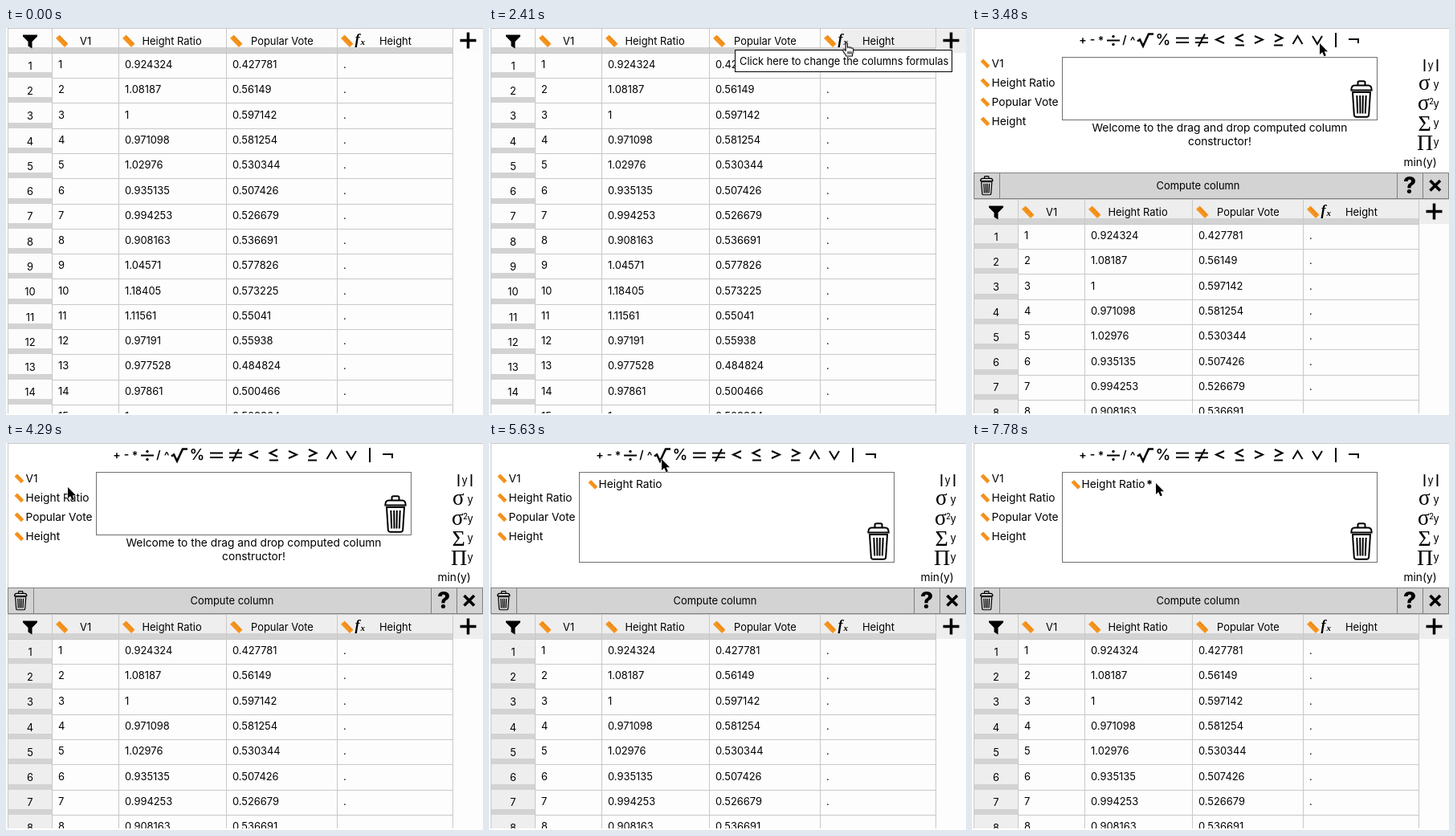
Write an HTML page that moves like this. It is 594 px wide and 482 px high and loops after 8000 ms.

```html
<!DOCTYPE html>
<html lang="en">
<head>
<meta charset="utf-8">
<title>Computed column</title>
<style>
html, body { margin: 0; width: 100%; height: 100%; overflow: hidden; background: #fff; }
svg { display: block; font: 12.9px Inter, "Open Sans", sans-serif; }
.mid { text-anchor: middle; }
.list { font-size: 13.75px; }
.serif { font-family: "Liberation Serif", serif; }
.line { fill: none; stroke: #000; stroke-width: 2; }
.hand { fill: #fff; stroke: #000; stroke-width: 1.1; stroke-linejoin: round; }

#table, #tint, #tip, #panel, #welcome, #formula, #star, #box, #bin,
#cursor, #arrow, #point, #open, #closed, .head { animation: 8s step-end infinite; }

#table { animation-name: table; }
@keyframes table { 0% { transform: none } 33.375%, 100% { transform: translateY(213px) } }
.head { animation-name: head; }
@keyframes head { 0% { fill: #fcfcfc } 33.375%, 100% { fill: #eee } }
#tint { animation-name: tint; }
@keyframes tint {
  0% { opacity: 0; transform: translateX(471px) }
  16.75% { opacity: 1; transform: translateX(471px) }
  23.375% { opacity: 1; transform: translateX(438px) }
  33.375%, 100% { opacity: 0; transform: translateX(438px) }
}
#tip { animation-name: tip; }
@keyframes tip { 0% { opacity: 0 } 30.125% { opacity: 1 } 33.375%, 100% { opacity: 0 } }
#panel { animation-name: panel; }
@keyframes panel { 0% { opacity: 0 } 33.375%, 100% { opacity: 1 } }
#welcome { animation-name: welcome; }
@keyframes welcome { 0% { opacity: 1 } 63.625%, 100% { opacity: 0 } }
#formula { animation-name: formula; }
@keyframes formula { 0% { opacity: 0 } 63.625%, 100% { opacity: 1 } }
#star { animation-name: star; }
@keyframes star { 0% { opacity: 0 } 87.125%, 100% { opacity: 1 } }
#box { animation-name: box; }
@keyframes box { 0% { height: 78px } 63.625%, 100% { height: 112px } }
#bin { animation-name: bin; }
@keyframes bin { 0% { transform: translate(471px, 65px) } 63.625%, 100% { transform: translate(471px, 99px) } }

#arrow { animation-name: arrow; }
@keyframes arrow {
  0% { opacity: 0 } 13.375% { opacity: 1 } 23.375% { opacity: 0 } 33.375% { opacity: 1 }
  56.875% { opacity: 0 } 63.625% { opacity: 1 } 73.75% { opacity: 0 } 90.5%, 100% { opacity: 1 }
}
#point { animation-name: point; }
@keyframes point { 0% { opacity: 0 } 23.375% { opacity: 1 } 33.375%, 100% { opacity: 0 } }
#open { animation-name: open; }
@keyframes open {
  0% { opacity: 0 } 56.875% { opacity: 1 } 60.25% { opacity: 0 }
  73.75% { opacity: 1 } 83.75%, 100% { opacity: 0 }
}
#closed { animation-name: closed; }
@keyframes closed {
  0% { opacity: 0 } 60.25% { opacity: 1 } 63.625% { opacity: 0 }
  83.75% { opacity: 1 } 90.5%, 100% { opacity: 0 }
}
#cursor { animation-name: cursor; }
@keyframes cursor {
  0% { transform: translate(571px, 111px) }
  16.75% { transform: translate(473px, 37px) }
  20.125% { transform: translate(451px, 30px) }
  23.375% { transform: translate(440px, 17.5px) }
  33.375% { transform: translate(444px, 19px) }
  43.5% { transform: translate(433px, 19px) }
  46.875% { transform: translate(268px, 21px) }
  50.25% { transform: translate(145px, 40px) }
  53.625% { transform: translate(77px, 55px) }
  56.875% { transform: translate(46px, 72px) }
  63.625% { transform: translate(74px, 57px) }
  67% { transform: translate(173px, 30px) }
  70.375% { transform: translate(215px, 20px) }
  73.75% { transform: translate(186px, 12px) }
  77% { transform: translate(135px, 12px) }
  80.375% { transform: translate(152px, 10px) }
  83.75% { transform: translate(155px, 12px) }
  90.5% { transform: translate(208px, 50px) }
  93.875% { transform: translate(223px, 50px) }
  97.25%, 100% { transform: translate(229px, 50px) }
}
</style>
</head>
<body>
<svg id="stage" width="594" height="482" viewBox="0 0 594 482"></svg>
<script>
const rect = (x, y, w, h, fill, more = '') =>
  `<rect x="${x}" y="${y}" width="${w}" height="${h}" fill="${fill}" ${more}/>`;
const text = (x, y, s, more = '') => `<text x="${x}" y="${y}" ${more}>${s}</text>`;
const path = (d, more = 'class="line"') => `<path d="${d}" ${more}/>`;
const group = (id, body) => `<g id="${id}">${body}</g>`;

const ruler = (x, y, k = 1) => `<g transform="translate(${x} ${y}) scale(${k})">` +
  path('M0 4.3 4.6 0 15.5 11.2 11 15.5Z', 'fill="#f7941d"') +
  path('M6.2 2.4 4.8 3.8M8.4 4.6 6.4 6.5M10.6 6.8 9.2 8.2M12.8 9 10.8 10.9',
    'stroke="#c8700f" stroke-width=".9"') + '</g>';

const trash = path('M9.5 6V3Q9.5 1.2 11.3 1.2H16.7Q18.5 1.2 18.5 3V6' +
  'M1.3 12.5Q1.3 6.5 5.5 6.5H22.5Q26.7 6.5 26.7 12.5Z' +
  'M3 15H25L23.2 43Q23 45.8 20.2 45.8H7.8Q5 45.8 4.8 43Z' +
  'M8.3 19 9.2 41.5M12.2 19 12.5 41.5M15.8 19 15.5 41.5M19.7 19 18.8 41.5');

const LINE = '#c8c8c8', BAR = '#d3d3d3', PITCH = 31.28;
const cols = [57, 140, 274, 412, 556];
const titles = [['V1', 92], ['Height Ratio', 169.5], ['Popular Vote', 305], ['Height', 465]];
const ratios = '0.924324 1.08187 1 0.971098 1.02976 0.935135 0.994253 0.908163 1.04571 1.18405 1.11561 0.97191 0.977528 0.97861 1'.split(' ');
const votes = '0.427781 0.56149 0.597142 0.581254 0.530344 0.507426 0.526679 0.536691 0.577826 0.573225 0.55041 0.55938 0.484824 0.500466 0.508364'.split(' ');

function table() {
  const at = (y, i) => Math.round(y + PITCH * i);
  let s = rect(2, 0, 592, 482, '#fdfdfd') +
    rect(2, 0, 592, 31, '#eee', 'class="head"') +
    group('tint', rect(0, 2, 156, 29, '#eee')) +
    rect(2, 24, 554, 7, BAR);
  ratios.forEach((ratio, i) => {
    const y = at(30.9, i), end = at(30.9, i + 1);
    s += rect(2, y, 55, end - y, '#eee', 'class="head"') +
      rect(2, end - 7, 55, 7, BAR) + rect(2, end, 555, 1, LINE) +
      text(30, at(51.7, i), i + 1, 'class="mid"');
    [i + 1, ratio, votes[i], '.'].forEach((v, c) => s += text(cols[c] + 8, at(50.1, i), v));
  });
  s += rect(2, 0, 592, 1, LINE) + rect(2, 31, 555, 1, LINE) + rect(2, 0, 1, 482, LINE);
  cols.forEach(x => s += rect(x, 0, 1, 482, LINE));
  titles.forEach(([name, x], c) => s += ruler(cols[c] + 5, 8.5) + text(x, 21, name));
  return s + path('M21 8.5H39V10.5L32.5 17V25.5L27.5 22.5V17L21 10.5Z', '') +
    text(434.5, 20, 'f', 'class="serif" font-size="18" font-weight="700" font-style="italic"') +
    text(441.5, 21, 'x', 'class="serif" font-size="11" font-weight="700" font-style="italic"') +
    path('M575.5 5.5V25.5M565.5 15.5H585.5', 'stroke="#000" stroke-width="3.5"');
}

function operators() {
  const small = [['+', 138, 20], ['-', 150, 19], ['*', 160.5, 21], ['/', 190, 20], ['^', 200, 21]];
  const less = x => `M${x + 5} 10 ${x - 5} 14.5 ${x + 5} 19`;
  const more = x => `M${x - 5} 10 ${x + 5} 14.5 ${x - 5} 19`;
  return small.map(([s, x, y]) => text(x, y, s, 'class="mid" font-size="14" font-weight="600"')).join('') +
    text(238, 21, '%', 'class="mid" font-size="19" font-weight="500"') +
    path('M168 15.5H184') +
    '<circle cx="176" cy="10.5" r="1.7"/><circle cx="176" cy="20.5" r="1.7"/>' +
    path('M206 16.5 209 14.5 213 22.5 220 7.5H226', 'class="line" style="stroke-width:2.6"') +
    path('M254 12.5H270M254 18H270M278 12.5H294M278 18H294M290 7.5 282 23') +
    path(less(309) + more(357)) +
    path('M338 8 328.5 12.5 338 17M328 21.5H339M377 8 386.5 12.5 377 17M376 21.5H387') +
    path('M399.5 20 405.5 10 411.5 20M424 10 430 20 436 10M453 6V24M469 14H481V19');
}

function functions() {
  const sign = (x, y, s, size) => text(x, y, s, `class="serif" font-size="${size}"`);
  return path('M563.5 39V54M579.5 39V54', 'stroke="#000" stroke-width="1.8"') +
    text(567.5, 51, 'y') +
    sign(556, 77, 'σ', 27) + text(574.5, 75, 'y') +
    sign(555, 102, 'σ', 27) + text(569, 95, '2', 'font-size="10"') + text(574.5, 99, 'y') +
    sign(555.5, 128, 'Σ', 28) + text(574.5, 123, 'y') +
    sign(554, 152, 'Π', 28) + text(574.5, 147, 'y') +
    text(537.5, 172, 'min(y)', 'class="list"');
}

function panel() {
  const frame = 'stroke="#7f7f7f"';
  let s = rect(0, 0, 594, 213, '#fff') + rect(2, 0, 592, 1, LINE) + rect(2, 0, 1, 213, LINE) +
    operators() + functions();
  titles.forEach(([name], i) =>
    s += ruler(10.5, 38.5 + 24 * i, .76) + text(24.5, 49 + 24 * i, name, 'class="list"'));
  s += rect(112, 36, 392, 78, '#fff', 'id="box" transform="translate(.5 .5)" stroke="#707070"') +
    group('bin', trash) +
    group('welcome',
      text(308.5, 129, 'Welcome to the drag and drop computed column', 'class="list mid"') +
      text(308.5, 146, 'constructor!', 'class="list mid"')) +
    group('formula', ruler(123.5, 46, .76) + text(136.5, 56, 'Height Ratio', 'class="list"')) +
    group('star', text(217, 57, '*', 'font-size="14" font-weight="800"'));
  [[2, 32], [34, 495], [529, 32], [561, 32]].forEach(([x, w]) =>
    s += rect(x + .5, 180.5, w, 32, BAR, frame));
  return s + `<g transform="translate(9.8 184) scale(.6 .52)">${trash}</g>` +
    text(281.5, 201, 'Compute column', 'class="mid"') +
    text(545, 206, '?', 'class="mid" font-size="28" font-weight="800"') +
    path('M570.5 190 583 202.5M583 190 570.5 202.5', 'stroke="#000" stroke-width="3.6"');
}

const tip = rect(306.5, 27.5, 270, 27, '#fff', 'stroke="#000"') +
  text(312, 46, 'Click here to change the columns formulas');

const cursor =
  group('arrow', path('M0 0V14L3.2 11 5.5 16.2 7.9 15.2 5.7 10.2H10Z',
    'stroke="#fff" stroke-width="1" paint-order="stroke"')) +
  group('point', path('M5 17.5C4 15.5 1.5 12.5.8 11 .3 9.6 1.8 8.6 3 9.6L4.2 11V2C4.2.4 6.4.4 6.4 2V7' +
    'C7 5.9 8.8 6 9 7.2 9.8 6.3 11.3 6.6 11.5 7.9 12.3 7.2 13.8 7.6 13.8 9.2 13.8 12.5 13.2 13.5 12.5 15.5V17.5Z' +
    'M7 11.5V15M9 11.5V15M11 11.5V15', 'class="hand"')) +
  group('open', path('M4.5 16.5C4 14.5 2 12.5.8 10.8.3 9.6 1.6 8.6 2.8 9.6L4.2 11 2.6 5.2C2.3 3.8 4 3.3 4.6 4.6' +
    'L6 8 5.6 2.4C5.6.9 7.5.8 7.8 2.3L8.4 7.6 9.3 2.4C9.6 1 11.4 1.3 11.2 2.8L10.9 8 12.6 4.6' +
    'C13.2 3.5 14.9 4 14.5 5.4L13.4 11C13 13.5 12.2 14.5 12 16.5Z', 'class="hand"')) +
  group('closed', path('M4.5 16.5C4 14 2 12.5 1.5 10.5 1.3 8.8 2.6 8.3 3.4 9V7C3.4 5.2 5.4 5 6 6.2' +
    'C6.4 4.8 8.2 4.8 8.6 6 9.2 5 10.9 5.1 11.1 6.6 12 5.8 13.6 6.3 13.6 8 13.6 11 13 14 12 16.5Z' +
    'M6 6.2V8.5M8.6 6V8.5M11.1 6.6V8.7', 'class="hand"'));

document.getElementById('stage').innerHTML =
  group('table', table()) + group('panel', panel()) + group('tip', tip) +
  rect(0, 480, 594, 2, '#fff') + group('cursor', cursor);
</script>
</body>
</html>
```
